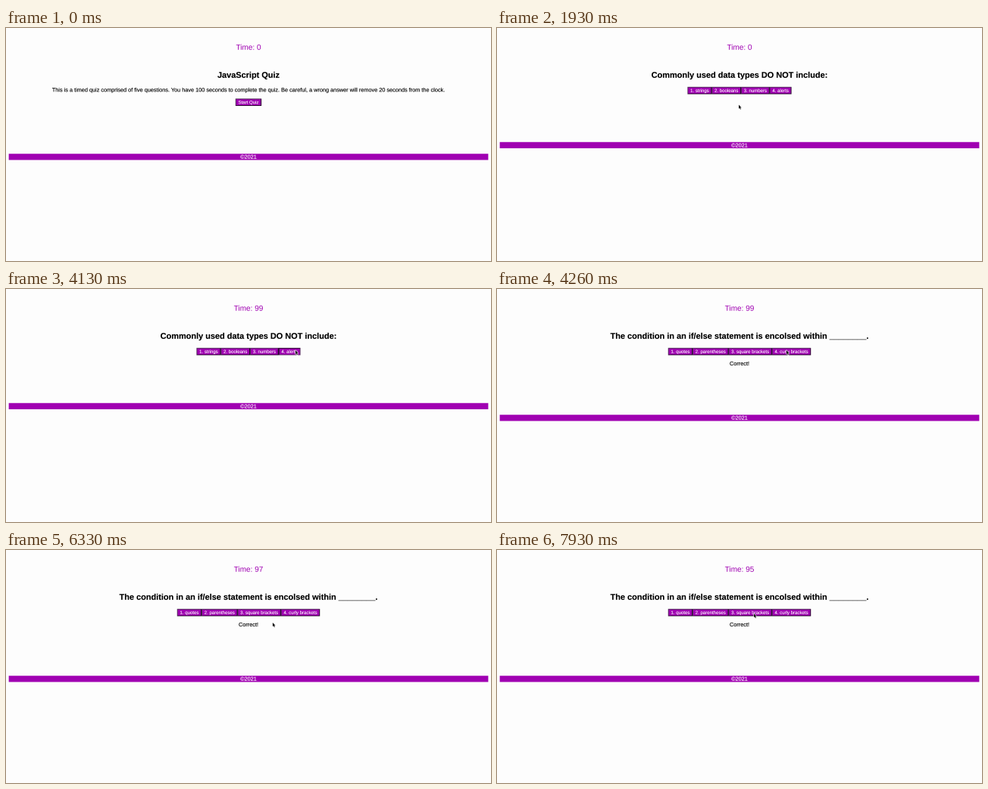
These frames come from a looping animation (640x308 px, 8 s). An HTML page with a canvas:

```html
<!DOCTYPE html>
<html lang="en">
<head>
<meta charset="utf-8">
<title>Timed quiz</title>
<style>
  html, body { margin: 0; width: 640px; height: 308px; overflow: hidden; background: #fdfdfd; }
  canvas { display: block; }
</style>
</head>
<body>
<canvas id="stage" width="640" height="308"></canvas>
<script>
const stage = document.getElementById('stage');
const view = stage.getContext('2d');
view.imageSmoothingQuality = 'high';

// The page is laid out at full size on a fine canvas, then scaled down.
const FINE = 4;
const SCALE = 0.4555;
const fine = document.createElement('canvas');
fine.width = stage.width * FINE;
fine.height = stage.height * FINE;
const ctx = fine.getContext('2d');
ctx.scale(SCALE * FINE, SCALE * FINE);
ctx.textAlign = 'center';
ctx.lineJoin = 'round';
ctx.textRendering = 'geometricPrecision';

const LOOP = 8000;
const WIDTH = stage.width / SCALE;
const MID = WIDTH / 2;
const FAMILY = '"Liberation Sans", Arial, Helvetica, sans-serif';
const PURPLE = '#a000b2';
const START = { press: 1660, click: 1800 };
const ANSWER = { press: 4130, click: 4260 };
const FIRST_TICK = 2800;

const GAP = 16, LINE = 18, BUTTON = 21, BORDER = 2;

// Strings are paragraphs, arrays are rows of buttons.
const intro = {
  title: 'JavaScript Quiz',
  rows: [
    'This is a timed quiz comprised of five questions. You have 100 seconds to complete the quiz. ' +
      'Be careful, a wrong answer will remove 20 seconds from the clock.',
    ['Start Quiz']
  ]
};
const types = {
  title: 'Commonly used data types DO NOT include:',
  rows: [['1. strings', '2. booleans', '3. numbers', '4. alerts']]
};
const condition = {
  title: 'The condition in an if/else statement is encolsed within ________.',
  rows: [['1. quotes', '2. parentheses', '3. square brackets', '4. curly brackets'], 'Correct!']
};

// Pointer moves on the stage
const entry = { x: 484, y: 142 };
const moves = [
  { from: 530, to: 1260, x: 319, y: 101.5 },
  { from: 2530, to: 3000, x: 315.5, y: 95 },
  { from: 3000, to: 4060, x: 382, y: 81 },
  { from: 4800, to: 5200, x: 392, y: 101 },
  { from: 5800, to: 6860, x: 312, y: 91 },
  { from: 7060, to: 7860, x: 339, y: 84 }
];

function text(str, x, y, size, color, weight = 'normal', smear = 0.3) {
  ctx.font = `${weight} ${size}px ${FAMILY}`;
  ctx.fillStyle = ctx.strokeStyle = color;
  ctx.fillText(str, x, y);
  if (smear) {
    ctx.lineWidth = smear;
    ctx.strokeText(str, x, y);
  }
}

function poly(points, color) {
  ctx.beginPath();
  points.forEach(([x, y]) => ctx.lineTo(x, y));
  ctx.closePath();
  ctx.fillStyle = color;
  ctx.fill();
}

function button(label, x, y, w, pressed) {
  const light = '#56305f', dark = '#1c0021';
  const r = x + w, d = y + BUTTON, b = BORDER;
  ctx.fillStyle = pressed ? light : dark;
  ctx.fillRect(x, y, w, BUTTON);
  poly([[x, y], [r, y], [r - b, y + b], [x + b, y + b], [x + b, d - b], [x, d]],
    pressed ? dark : light);
  ctx.fillStyle = PURPLE;
  ctx.fillRect(x + b, y + b, w - 2 * b, BUTTON - 2 * b);
  text(label, x + w / 2, y + 15.2, 13.333, '#fff');
}

function buttonRow(labels, y, pressed) {
  ctx.font = `13.333px ${FAMILY}`;
  const widths = labels.map(s => ctx.measureText(s).width + GAP);
  let x = MID - widths.reduce((a, b) => a + b) / 2;
  labels.forEach((label, i) => {
    button(label, x, y, widths[i], label === pressed);
    x += widths[i];
  });
}

function pointer(t) {
  if (t < moves[0].from) return;
  let { x, y } = entry;
  for (const m of moves) {
    const k = Math.min(1, Math.max(0, (t - m.from) / (m.to - m.from)));
    const e = k * k * (3 - 2 * k);
    x += (m.x - x) * e;
    y += (m.y - y) * e;
  }
  ctx.save();
  ctx.translate(x / SCALE, y / SCALE);
  const arrow = [[0, 0], [0, 11.5], [2.6, 9], [4.5, 13.5], [6.5, 12.6], [4.6, 8.4], [8, 8.4]];
  poly(arrow, '#111');
  ctx.lineWidth = 2;
  ctx.strokeStyle = '#fff';
  ctx.stroke();
  poly(arrow, '#111');
  ctx.restore();
}

function draw(t) {
  const screen = t < START.click ? intro : t < ANSWER.click ? types : condition;
  const left = t < FIRST_TICK ? 0 : 100 - Math.floor((t - FIRST_TICK) / 1000);
  const held = ({ press, click }) => t >= press && t < click;
  const pressed = held(START) ? 'Start Quiz' : held(ANSWER) ? '4. alerts' : '';

  ctx.fillStyle = '#fdfdfd';
  ctx.fillRect(0, 0, WIDTH, stage.height / SCALE);
  text('Time: ' + left, MID, 63.2, 22, PURPLE, 'normal', 0);
  text(screen.title, MID, 144.5, 24, '#000', 'bold');

  let y = 171;
  for (const row of screen.rows) {
    if (Array.isArray(row)) {
      buttonRow(row, y, pressed);
      y += BUTTON + GAP;
    } else {
      text(row, MID, y + 13.8, 16.06, '#000');
      y += LINE + GAP;
    }
  }

  y += 123;
  ctx.fillStyle = PURPLE;
  ctx.fillRect(8, y, WIDTH - 16, LINE);
  text('©2021', MID, y + 14.5, 16, '#fff');
  pointer(t);

  view.drawImage(fine, 0, 0, stage.width, stage.height);
}

const begin = performance.now();
function frame() {
  draw((performance.now() - begin) % LOOP);
  requestAnimationFrame(frame);
}
frame();
</script>
</body>
</html>
```
